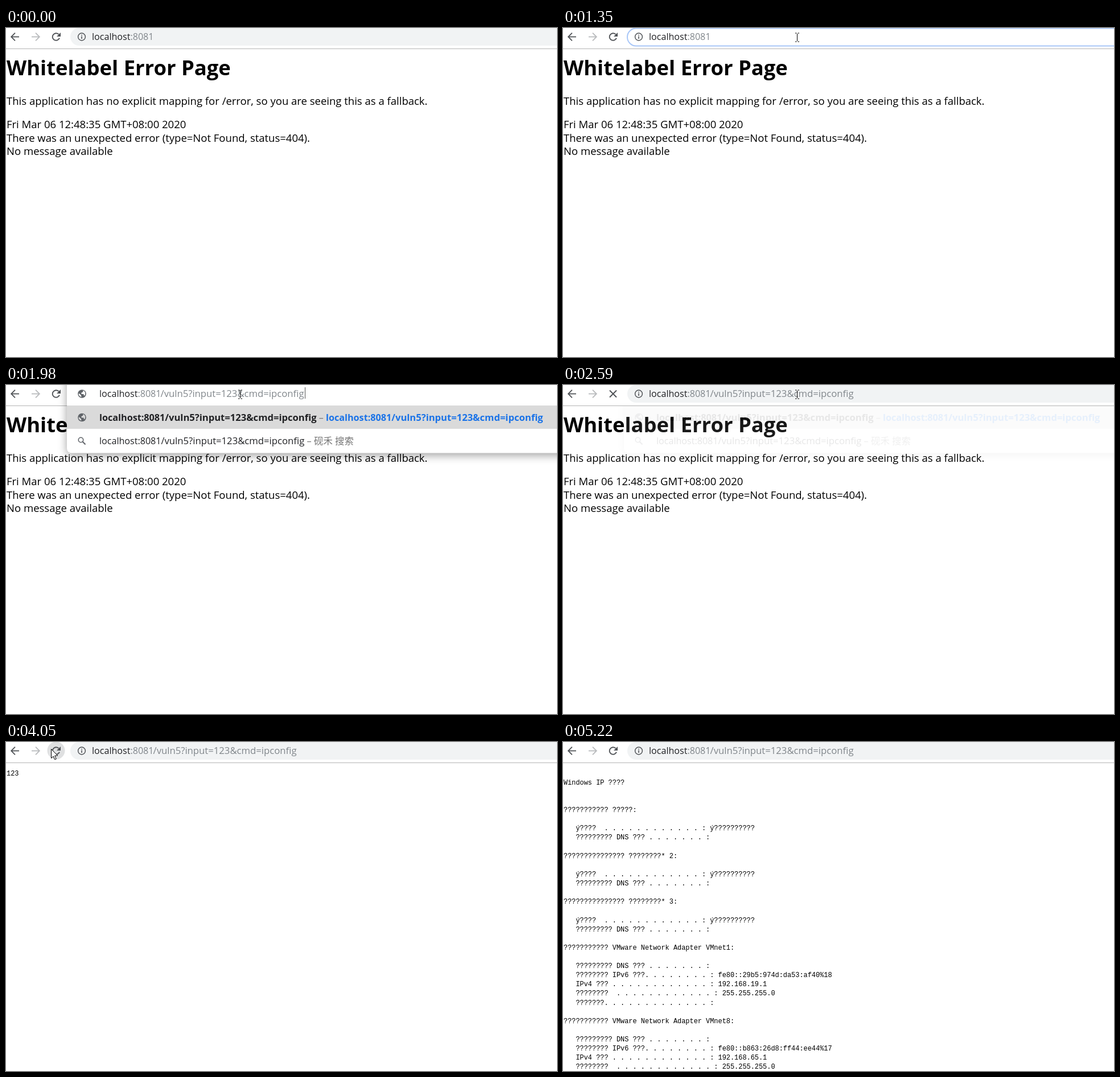
An HTML page with a canvas for the animation above (5680 ms loop, 968x578 px).

```html
<!DOCTYPE html>
<html lang="en">
<head>
<meta charset="utf-8">
<title>Browser demo</title>
<style>
html, body { margin: 0; width: 100%; height: 100%; overflow: hidden; background: #fff; }
canvas { display: block; }
</style>
</head>
<body>
<canvas id="stage" width="968" height="578"></canvas>
<script>
const W = 968, H = 578, LOOP = 5680;
const screen2d = document.getElementById('stage').getContext('2d');
const layer = document.createElement('canvas');
layer.width = W;
layer.height = H;
const layer2d = layer.getContext('2d');
let g = screen2d;

const SANS = '"Open Sans", "Noto Sans", "Noto Sans CJK SC", "Noto Sans CJK JP", sans-serif';
const MONO = '"Liberation Mono", monospace';
const INK = '#202124', GREY = '#80868b', BLUE = '#1a73e8', ICON = '#505357';

const HOST = 'localhost', PORT = ':8081', ROOT = HOST + PORT + '/';
const OLD_CMD = 'vuln5?input=123&cmd=ifconfig';
const NEW_CMD = 'vuln5?input=123&cmd=ipconfig';

// Text styles: [font, colour]
const font = (size, weight = 400, family = SANS) => `${weight} ${size}px ${family}`;
const host = color => [font(16.1), color];
const path = color => [font(16.7), color];
const boldHost = color => [font(16.2, 700), color];
const boldPath = color => [font(16.6, 700), color];

function text(str, x, y, [f, color]) {
  g.font = f;
  g.fillStyle = color;
  g.fillText(str, x, y);
  return x + g.measureText(str).width;
}

function run(x, y, parts) {
  for (const [str, style] of parts) x = text(str, x, y, style);
  return x;
}

function line(points, color, width) {
  g.beginPath();
  points.forEach(([x, y], i) => i ? g.lineTo(x, y) : g.moveTo(x, y));
  g.strokeStyle = color;
  g.lineWidth = width;
  g.stroke();
}

function disc(x, y, r, color) {
  g.beginPath();
  g.arc(x, y, r, 0, Math.PI * 2);
  g.fillStyle = color;
  g.fill();
}

function polygon(points, color) {
  g.beginPath();
  points.forEach(([x, y]) => g.lineTo(x, y));
  g.closePath();
  g.fillStyle = color;
  g.fill();
}

function rect(x, y, w, h, color) {
  g.fillStyle = color;
  g.fillRect(x, y, w, h);
}

// Icons
function navArrow(x, dir, color) {
  line([[x - 7 * dir, 15.5], [x + 6 * dir, 15.5]], color, 1.8);
  line([[x, 8.7], [x + 6.8 * dir, 15.5], [x, 22.3]], color, 1.8);
}

function reloadIcon() {
  g.beginPath();
  g.arc(88, 15.5, 6.3, 0.35, -0.75, false);
  g.strokeStyle = ICON;
  g.lineWidth = 1.9;
  g.stroke();
  polygon([[96, 8], [96, 15], [89, 15]], ICON);
}

function stopIcon() {
  line([[82, 9.5], [94, 21.5]], ICON, 1.9);
  line([[94, 9.5], [82, 21.5]], ICON, 1.9);
}

function infoIcon() {
  g.beginPath();
  g.arc(133, 15.5, 6.4, 0, Math.PI * 2);
  g.strokeStyle = ICON;
  g.lineWidth = 1.5;
  g.stroke();
  rect(132.2, 14.5, 1.6, 4.5, ICON);
  rect(132.2, 11.7, 1.6, 1.6, ICON);
}

function globeIcon(y, back) {
  disc(133.5, y, 7.3, '#5f6368');
  polygon([[128, y - 1], [132, y + 2.5], [132.5, y + 5.8], [129.5, y + 4.3], [127.7, y + 1.5]], back);
  polygon([[135, y - 5.8], [135.5, y - 3.5], [132, y - 1.5], [133, y + 0.5], [136.5, y + 0.5],
    [137, y + 3.5], [139, y + 1.8], [139.2, y - 2], [137.5, y - 4.7]], back);
}

function searchIcon(y) {
  g.beginPath();
  g.arc(131.5, y - 1.8, 4.2, 0, Math.PI * 2);
  g.strokeStyle = '#5f6368';
  g.lineWidth = 1.6;
  g.stroke();
  line([[134.5, y + 1.2], [139.5, y + 6.2]], '#5f6368', 2);
}

// Pages
function errorPage() {
  text('Whitelabel Error Page', 1, 83, [font(36.4, 700), '#000']);
  const body = [font(18.5), '#000'];
  text('This application has no explicit mapping for /error, so you are seeing this as a fallback.', 1, 135, body);
  text('Fri Mar 06 12:48:35 GMT+08:00 2020', 1, 176, body);
  text('There was an unexpected error (type=Not Found, status=404).', 1, 199.5, body);
  text('No message available', 1, 222.5, body);
}

const q = n => '?'.repeat(n);
const dots = n => '. '.repeat(n) + ':';
const dns = `   ${q(9)} DNS ??? ${dots(7)}`;
const offline = title => ['', title, '', `   ý????  ${dots(12)} ý${q(10)}`, dns];
const adapter = (name, v6, v4) => ['', `${q(11)} VMware Network Adapter ${name}:`, '', dns,
  `   ${q(8)} IPv6 ???${dots(8)} ${v6}`,
  `   IPv4 ??? ${dots(12)} ${v4}`,
  `   ${q(8)}  ${dots(12)} 255.255.255.0`,
  `   ${q(7)}${dots(13)}`];
const OUTPUT = ['', 'Windows IP ????', '',
  ...offline(`${q(11)} ${q(5)}:`),
  ...offline(`${q(15)} ${q(8)}* 2:`),
  ...offline(`${q(15)} ${q(8)}* 3:`),
  ...adapter('VMnet1', 'fe80::29b5:974d:da53:af40%18', '192.168.19.1'),
  ...adapter('VMnet8', 'fe80::b863:26d8:ff44:ee44%17', '192.168.65.1')];

function terminalPage(lines) {
  lines.forEach((str, i) => text(str, 1, 58.6 + i * 16.12, [font(11.92, 400, MONO), '#000']));
}

// Toolbar
function toolbar(t, hover) {
  rect(0, 0, W, 36, '#fff');
  rect(0, 36, W, 1, '#b4b4b4');
  navArrow(16, -1, ICON);
  navArrow(52, 1, '#b9bbbd');
  if (hover) disc(88, 15, 15.5, '#dfe0e1');
  if (t >= 2510 && t < 2750) stopIcon();
  else reloadIcon();

  const focused = t >= 670 && t < 1580;
  g.beginPath();
  g.roundRect(113, focused ? 0.5 : 0, 900, 31, 15.5);
  g.fillStyle = focused ? '#fff' : '#f1f3f4';
  g.fill();
  if (focused) {
    g.strokeStyle = '#a9c7f8';
    g.lineWidth = 2;
    g.stroke();
  }
  infoIcon();
  run(151, 21.3, [[HOST, host(INK)], [PORT, host(GREY)]]);
  if (t >= 2510) text('/' + NEW_CMD, 258.5, 21.3, path(GREY));
  if (focused && t < 1350) rect(260, 4, 1, 20, '#555');
}

// Suggestion list
const hint = [' – 砚禾 搜索', [font(16.4), '#757575']];
const link = rest => [[ROOT, boldHost(BLUE)], [rest, path(BLUE)]];
const dash = [' – ', host('#757575')];
const SECRET = 'vuln5?input=123&secret=666';
const LIST_A = [
  link(OLD_CMD),
  [[ROOT, host(INK)], hint],
  link('vuln5?input=123&cmd=666'),
  link('vuln1?input=123&secret=666'),
  [[ROOT, boldHost(INK)], [SECRET, path(INK)], dash, ...link(SECRET)]
];
const LIST_B = [
  [[ROOT, boldHost(INK)], [NEW_CMD, boldPath(INK)], dash, [ROOT, boldHost(BLUE)], [NEW_CMD, boldPath(BLUE)]],
  [[ROOT, host(INK)], [NEW_CMD, path(INK)], hint]
];

function suggestions(rows, alpha) {
  g = layer2d;
  g.clearRect(0, 0, W, H);
  g.save();
  g.shadowColor = 'rgba(0,0,0,.38)';
  g.shadowBlur = 16;
  g.shadowOffsetY = 4;
  g.beginPath();
  g.roundRect(107, -30, 920, 67 + rows.length * 41.25, 8);
  g.fillStyle = '#fff';
  g.fill();
  g.restore();
  rect(107, 36, W, 41, '#dadada');
  rows.forEach((parts, i) => {
    const y = 57 + i * 41.3;
    if (i === 1) searchIcon(y);
    else globeIcon(y, i ? '#fff' : '#dadada');
    run(164, y + 5.6, parts);
  });
  g = screen2d;
  g.globalAlpha = alpha;
  g.drawImage(layer, 0, 0);
  g.globalAlpha = 1;
}

function openBar(typed) {
  rect(107, 0, W, 36, '#fff');
  globeIcon(15.5, '#fff');
  run(164, 21.3, [[HOST, host(INK)], [PORT, host(GREY)]]);
  if (typed) {
    text('/' + NEW_CMD, 271.5, 21.3, path(GREY));
    rect(525, 4, 1, 20, '#555');
  } else {
    text('/', 272, 21.3, host(GREY));
    rect(278, 5, 242, 22, '#0078d7');
    text(OLD_CMD, 279, 21.3, path('#fff'));
  }
}

// Pointer
const MOVES = [
  { at: 70, gap: 74, pts: [[807, 484], [720, 420], [560, 300], [370, 150], [200, 50], [130, 12], [210, 14], [300, 17]] },
  { at: 670, gap: 75, pts: [[355, 17], [362, 17], [380, 17], [400, 17], [411, 16]] },
  { at: 3360, gap: 76, pts: [[430, 17], [499, 17], [400, 16], [230, 15], [100, 13], [58, 12], [79, 12]] },
  { at: 4600, gap: 77, pts: [[82, 8], [130, 40], [240, 110], [390, 210], [560, 320], [720, 430], [850, 520], [929, 572], null] }
];

function pointerAt(t) {
  const move = MOVES.filter(m => t >= m.at).pop();
  if (!move) return null;
  const i = Math.floor((t - move.at) / move.gap);
  return move.pts[Math.min(i, move.pts.length - 1)];
}

function pointer([x, y], color) {
  if (y < 32 && x > 113) {
    const c = x + 0.5;
    line([[c, y - 6], [c, y + 7]], color, 1.2);
    for (const end of [y - 7, y + 8]) {
      line([[c - 3.5, end], [c - 1, end]], color, 1.2);
      line([[c + 1, end], [c + 3.5, end]], color, 1.2);
    }
    return;
  }
  const shape = [[0, 0], [0, 16], [3.7, 12.6], [6.3, 18.3], [8.8, 17.2], [6.2, 11.6], [11.3, 11.4], [0, 0]]
    .map(([dx, dy]) => [x + 0.5 + dx, y + 0.5 + dy]);
  polygon(shape, '#fff');
  line(shape, '#000', 1);
}

function draw(t) {
  const pos = pointerAt(t);
  const hover = pos && Math.hypot(pos[0] - 88, pos[1] - 15) < 16;
  const open = t >= 1580 && t < 2510;
  rect(0, 0, W, H, '#fff');
  if (t < 2750) errorPage();
  else terminalPage(t < 4210 ? ['123'] : OUTPUT);

  if (t >= 2510 && t < 2670) suggestions(LIST_B, t < 2590 ? 0.5 : 0.1);
  toolbar(t, hover);
  if (open) {
    const typed = t >= 1980;
    suggestions(typed ? LIST_B : LIST_A, t < 1670 ? 0.57 : 1);
    openBar(typed);
  }

  const click = (t >= 670 && t < 750) || (t >= 3980 && t < 4050);
  if (click) disc(t < 750 ? 354 : 79, t < 750 ? 17 : 13, 13, 'rgba(252,238,0,.6)');
  if (pos) pointer(pos, t >= 1580 && t < 1980 ? '#fff' : '#222');
}

function tick() {
  draw(performance.now() % LOOP);
  requestAnimationFrame(tick);
}
tick();
</script>
</body>
</html>
```
